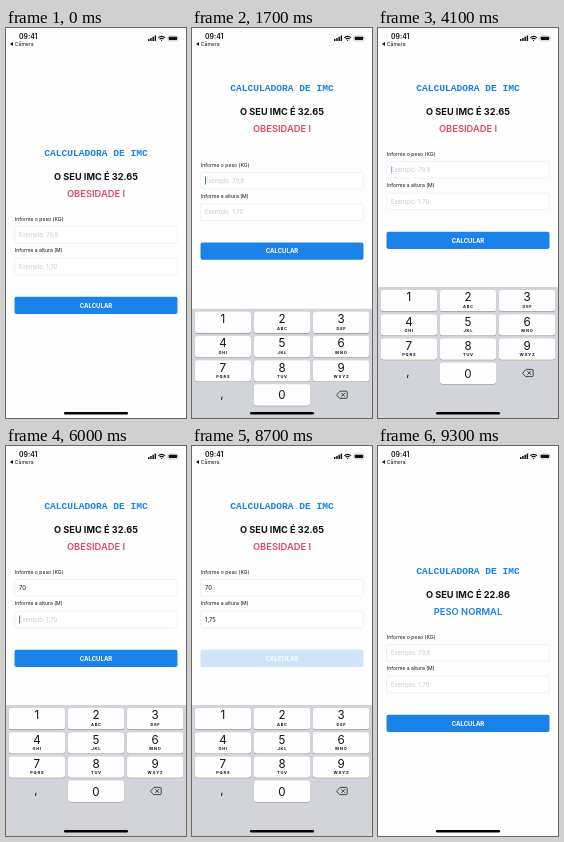
An HTML page for the animation above (9600 ms loop, 180 px wide and 390 px high).

```html
<!DOCTYPE html>
<html lang="pt">
<head>
<meta charset="utf-8">
<title>Calculadora de IMC</title>
<style>
  html, body { margin: 0; width: 100%; height: 100%; overflow: hidden; background: #fefefe; }
  svg { display: block; width: 180px; height: 390px; }
  text { font-family: Inter, Roboto, sans-serif; fill: #111; white-space: pre; }
  .mid { text-anchor: middle; }
  .title { font: bold 9.6px "Liberation Mono", monospace; fill: #1a82e4; }
  .result { font-size: 9.2px; font-weight: 700; }
  .status { font-size: 9.35px; font-weight: 600; }
  .label { font-size: 5.1px; }
  .value { font-size: 5.9px; }
  .button { font-size: 6px; font-weight: 700; fill: #fff; }
  .digit { font-size: 11.6px; }
  .letters { font-size: 4px; font-weight: 700; letter-spacing: .8px; }
</style>
</head>
<body>
<svg viewBox="0 0 180 390">
  <g id="header">
    <text class="title mid" x="90" y="63.2">CALCULADORA DE IMC</text>
    <text class="result mid" x="90" y="87.4" id="result"></text>
    <text class="status mid" x="90" y="103.5" id="status"></text>
  </g>
  <g id="form">
    <g id="fields"></g>
    <g id="button">
      <rect x="8.5" y="203.8" width="163" height="17.2" rx="2" fill="#1a82e8"/>
      <text class="button mid" x="90" y="214.6">CALCULAR</text>
    </g>
  </g>
  <g id="keyboard">
    <rect y="259" width="180" height="140" fill="#d2d4da"/>
    <g id="keys"></g>
    <text class="digit mid" x="30" y="348">,</text>
    <g fill="none" stroke="#222" stroke-width=".8" stroke-linejoin="round" stroke-linecap="round">
      <path d="M144.8 345l3.2-3.6h6.2q1 0 1 1v5.2q0 1-1 1H148z"/>
      <path d="M149.6 343.4l3.2 3.2m0-3.2l-3.2 3.2"/>
    </g>
  </g>
  <g id="statusbar">
    <text x="13" y="10.6" font-size="6.9" font-weight="600">09:41</text>
    <path d="M7 13.9v4.2L4 16z" fill="#111"/>
    <text x="8.8" y="17.8" font-size="5.1">Câmera</text>
    <path d="M142 11h1.5v2h-1.5zm2.2-1h1.5v3h-1.5zm2.2-1.2h1.5v4.2h-1.5zm2.2-1.2h1.5v5.4h-1.5z" fill="#111"/>
    <g fill="none" stroke="#111" stroke-width="1.1">
      <path d="M152.3 9.8a4.6 4.6 0 0 1 6.6 0M153.6 11.2a2.8 2.8 0 0 1 4 0"/>
      <path d="M155.1 12.5h1"/>
    </g>
    <rect x="161.9" y="7.9" width="10" height="5" rx="1.5" fill="none" stroke="#999" stroke-width=".5"/>
    <rect x="162.7" y="8.7" width="8.4" height="3.4" rx=".8" fill="#111"/>
    <path d="M172.6 9.6q.8.8 0 1.6z" fill="#999"/>
  </g>
  <rect x="58" y="384" width="64" height="2.4" rx="1.2" fill="#000"/>
</svg>
<script>
const LOOP = 9600, STEP = 100;
const OPEN = 1430, FOCUS = 1500, CLOSE = 8760, SUBMIT = 8800, SETTLED = 9300;
const $ = id => document.getElementById(id);

// Timelines: [start, value] pairs, each held until the next.
const fields = [
  {
    label: 'Informe o peso (KG)', hint: 'Exemplo: 79,8', y: 133.6,
    text: [[0, ''], [5200, '7'], [5400, '70'], [SUBMIT, '']],
    caret: [[0, 0], [FOCUS, 1], [2500, .7], [2600, .35], [2700, 0], [3100, .5], [3200, 1],
      [3500, .5], [3600, 0], [4100, .5], [4200, 1], [4500, .5], [4600, 0], [5100, 1], [5800, 0]]
  },
  {
    label: 'Informe a altura (M)', hint: 'Exemplo: 1,70', y: 165.1,
    text: [[0, ''], [6900, '1'], [7100, '1,'], [7500, '1,7'], [7900, '1,75'], [SUBMIT, '']],
    caret: [[0, 0], [5900, .5], [6000, 1], [6500, .5], [6600, 0], [6800, 1], [8300, .5], [8400, 0]]
  }
];
const pressed = [[0, ''], [5100, '7'], [5200, ''], [5300, '0'], [5400, ''],
  [6800, '1'], [6900, ''], [7400, '7'], [7500, ''], [7800, '5'], [7900, '']];
const buttonAlpha = [[0, 1], [8500, .65], [8600, .2], [8800, .35], [8900, .75], [9000, 1]];

const at = (line, t) => line.findLast(([start]) => start <= t)[1];
const move = (id, y) => $(id).setAttribute('transform', `translate(0 ${y})`);

$('fields').innerHTML = fields.map(({ label, y }, i) => `
  <text class="label" x="8.8" y="${y - 5.7}">${label}</text>
  <rect x="8.7" y="${y}" width="162.6" height="16.6" rx="2" fill="#fff" stroke="#e9e9ec" stroke-width=".6"/>
  <text class="value" id="value${i}" x="13" y="${y + 10.5}"></text>
  <rect id="caret${i}" y="${y + 4.3}" width="1" height="8" rx=".4" fill="#4a70e0"/>`).join('');

const letters = ['', 'ABC', 'DEF', 'GHI', 'JKL', 'MNO', 'PQRS', 'TUV', 'WXYZ'];
const key = (digit, col, row, sub) => {
  const x = 2.8 + col * 59.1, y = 262 + row * 24.2, mid = x + 28.1;
  return `<rect x="${x}" y="${y + .6}" width="56.2" height="21.3" rx="2.4" fill="#8d8f94"/>
    <rect id="key${digit}" x="${x}" y="${y}" width="56.2" height="21.3" rx="2.4"/>
    <text class="digit mid" x="${mid}" y="${y + (digit ? 11.4 : 15)}">${digit}</text>
    <text class="letters mid" x="${mid + .4}" y="${y + 17.8}">${sub}</text>`;
};
$('keys').innerHTML = letters.map((sub, i) => key(i + 1, i % 3, i / 3 | 0, sub)).join('') + key(0, 1, 3, '');

// Critically damped spring from 0 to 1.
const spring = (ms, rate) => {
  const x = Math.max(0, ms) / 1000 * rate;
  return 1 - (1 + x) * Math.exp(-x);
};
const keyboardLift = t =>
  t >= SETTLED ? 0 : t >= CLOSE ? 1 - spring(t - CLOSE, 14) : t >= 2500 ? 1 : spring(t - OPEN, 12);

function draw(t) {
  const hidden = 1 - keyboardLift(t), done = t >= SUBMIT;
  move('header', t >= FOCUS && !done ? 0 : 65);
  move('form', 65 * hidden);
  move('keyboard', 131 * hidden);

  $('result').textContent = `O SEU IMC É ${done ? '22.86' : '32.65'}`;
  $('status').textContent = done ? 'PESO NORMAL' : 'OBESIDADE I';
  $('status').style.fill = done ? '#1a82e4' : '#dc4c5e';
  $('button').setAttribute('opacity', at(buttonAlpha, t));

  fields.forEach((field, i) => {
    const text = at(field.text, t), value = $('value' + i), caret = $('caret' + i);
    value.textContent = text || field.hint;
    value.style.fill = text ? '#111' : '#c8c8cd';
    caret.setAttribute('x', 13 + (text ? value.getComputedTextLength() : 0));
    caret.setAttribute('opacity', at(field.caret, t));
  });

  const down = at(pressed, t);
  for (let d = 0; d < 10; d++) $('key' + d).setAttribute('fill', down === String(d) ? '#b3b7c0' : '#fefefe');
}

function tick() {
  const t = performance.now() % LOOP;
  draw(Math.floor(t / STEP) * STEP);
  requestAnimationFrame(tick);
}
tick();
</script>
</body>
</html>
```
